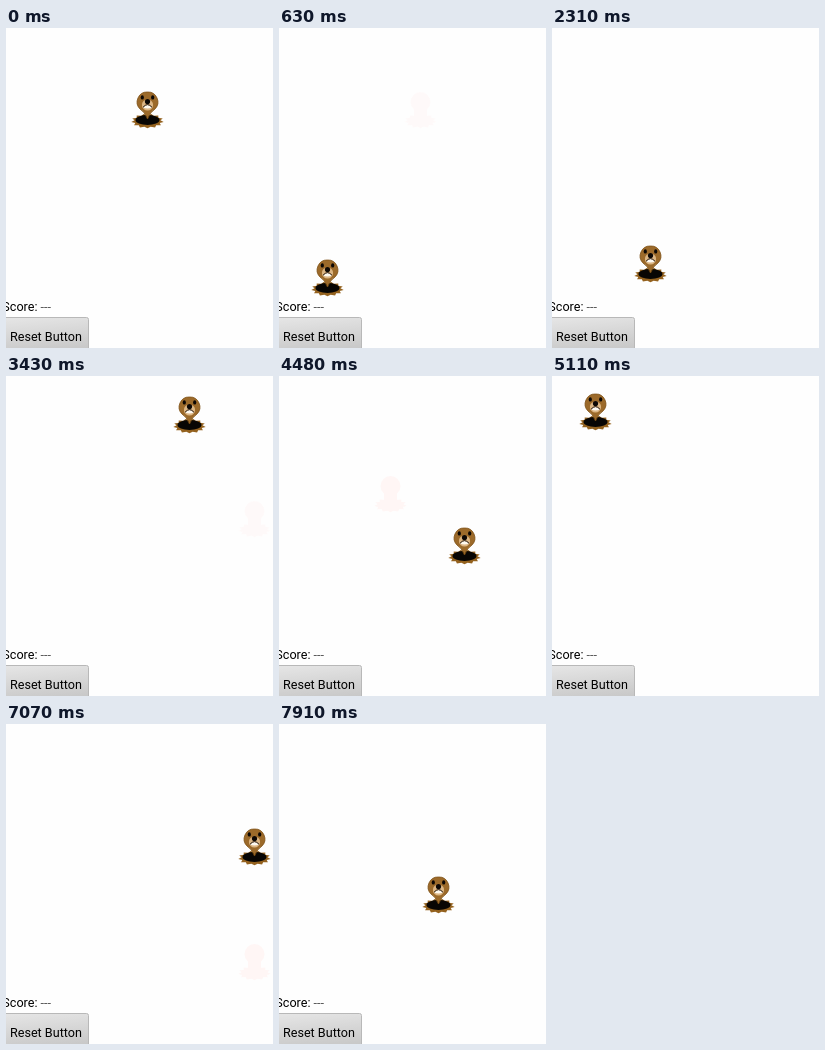
These frames come from a looping animation (267x320 px, 8 s). An HTML page:

```html
<!DOCTYPE html>
<html lang="en">
<head>
<meta charset="utf-8">
<title>Mole game</title>
<style>
  html, body { margin: 0; width: 100%; height: 100%; overflow: hidden; background: #fefefe; }
  svg { display: block; width: 267px; height: 320px; }
  text { font: 12.6px Roboto, Arial, sans-serif; fill: #000; }
</style>
</head>
<body>
<svg viewBox="0 0 267 320">
  <defs>
    <linearGradient id="face" x2=".2" y2="1">
      <stop offset="0" stop-color="#e6e6e6"/>
      <stop offset="1" stop-color="#c8c8c8"/>
    </linearGradient>
    <polygon id="dirt"/>
    <path id="head" d="M16.5 1A10 10 0 0 1 24 18Q19 21 16.5 28Q14 21 9 18A10 10 0 0 1 16.5 1Z"/>
  </defs>

  <g id="ghost" fill="#fff6f5">
    <use href="#dirt"/>
    <circle cx="16.5" cy="11" r="10"/>
    <rect x="10" y="18" width="13" height="8"/>
  </g>

  <g id="mole">
    <use href="#dirt" fill="#94621f"/>
    <ellipse cx="16.5" cy="29" rx="12" ry="5" fill="#080604"/>
    <use href="#head" fill="#9c6a2a" stroke="#7d5015" stroke-width=".8"/>
    <circle cx="16.5" cy="14" r="5.6" fill="#dcb684"/>
    <g fill="#0c0704">
      <ellipse cx="11.3" cy="6.4" rx="1.6" ry="2.2"/>
      <ellipse cx="21.7" cy="6.4" rx="1.6" ry="2.2"/>
      <circle cx="16.5" cy="10.6" r="2.6"/>
    </g>
    <path d="M12 16.5Q16.5 11 21 16.5Q16.5 18.5 12 16.5Z" fill="#fffaf0"/>
    <path d="M12 16.3Q16.5 11 21 16.3" fill="none" stroke="#1c0f06"/>
  </g>

  <text x="-3.7" y="283">Score: <tspan fill="#555">---</tspan></text>
  <rect x="-3" y="289.5" width="85.5" height="36" rx="2" fill="url(#face)" stroke="#b8b8b8"/>
  <text x="4" y="313">Reset Button</text>
</svg>
<script>
  const TICK = 70, LOOP = 8000, FADE = 2;
  // each place: x, y, ticks the mole stays there
  const stops = [
    [125, 63, 8], [32, 231, 7], [144, 150, 8], [140, 139, 8], [82, 217, 8],
    [232, 124, 9], [167, 20, 8], [95, 99, 8], [169, 151, 7], [27, 17, 8],
    [112, 141, 8], [197, 12, 7], [232, 219, 7], [232, 104, 7], [143, 152, 7]
  ];
  const byId = id => document.getElementById(id);
  const mole = byId('mole'), ghost = byId('ghost');
  const place = (el, [x, y]) => el.setAttribute('transform', `translate(${x} ${y})`);

  // ragged ring of earth around the hole
  const SPIKES = 13;
  byId('dirt').setAttribute('points', Array.from({ length: SPIKES * 2 }, (_, k) => {
    const a = (k + .5) * Math.PI / SPIKES, r = k % 2 ? .8 : 1;
    return [16.5 + 16.3 * r * Math.cos(a), 30 + 7.3 * r * Math.sin(a)];
  }).join(' '));

  function draw(now) {
    let tick = Math.floor(now % LOOP / TICK), i = 0;
    while (i < stops.length - 1 && tick >= stops[i][2]) tick -= stops[i++][2];
    place(mole, stops[i]);
    place(ghost, stops[Math.max(0, i - 1)]);
    ghost.setAttribute('opacity', i ? Math.max(0, 1 - tick / FADE) : 0);
  }

  const begin = performance.now();
  function loop() {
    draw(performance.now() - begin);
    requestAnimationFrame(loop);
  }
  loop();
</script>
</body>
</html>
```
